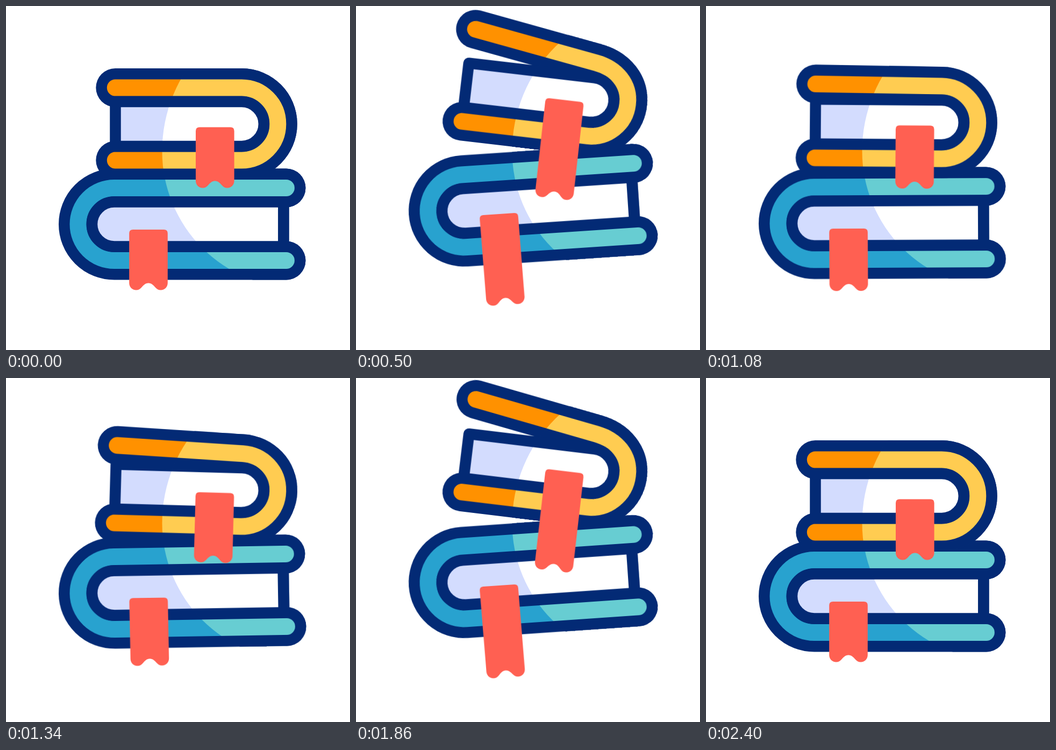
Animation, 640 px wide and 640 px high, one loop 2620 ms. Source, as an HTML page:

```html
<!DOCTYPE html>
<html lang="en">
<head>
<meta charset="utf-8">
<title>Books</title>
<style>
html, body { margin: 0; height: 100%; overflow: hidden; background: #fff; }
svg { display: block; width: 100vw; height: 100vh; }
path { fill: none; stroke-linecap: round; stroke-linejoin: round; }

.edge { stroke: #032a75; stroke-width: 72; }
.skin { stroke: var(--skin); stroke-width: 31; }
.page { stroke: #032a75; stroke-width: 20.5; fill: var(--page); }
.mark { fill: #ff6052; }

.dark { --page: #d3dcfe; }
.light { --page: #fff; }
.upper.dark { --skin: #ff9100; }
.upper.light { --skin: #ffcc51; }
.lower.dark { --skin: #28a2cf; }
.lower.light { --skin: #67cdd2; }

/* whole books: lift and tilt */
.upper, .lower { animation: lift 2620ms linear infinite; }
.upper { transform-origin: 438.3px 219.5px; --up: translateY(-47px) rotate(7deg); }
.lower { transform-origin: 201.5px 406px; --up: translateY(-26px) rotate(-4deg); }

.lower .cover { d: path("M521.4 338.5H201.5A67.5 67.5 0 0 0 201.5 473.5H521.4"); }
.lower .page { d: path("M201.5 364.5H516.3V447.5H201.5A41.5 41.5 0 0 1 201.5 364.5Z"); }
.upper .page { d: path("M438.3 178H203.5V261H438.3A41.5 41.5 0 0 0 438.3 178Z"); }

/* opening cover and stretching ribbons */
.upper .cover, .mark { d: var(--rest); animation: morph 2620ms linear infinite; }
.upper .cover {
  --rest: path("M203.3 152L438.3 152C475.6 152 505.8 182.2 505.8 219.5C505.8 256.8 475.6 287 438.3 287L203.3 287");
  --peak: path("M208.7 112L439 149.9C477.5 156.2 505.8 182.2 505.8 219.5C505.8 256.8 475.6 287 438.3 287L203.3 287");
}
.upper .mark {
  --rest: path("M353 232.5q0-7 7-7l57.6 0q7 0 7 7l0 93c0 7-5.5 13-13 13c-4 0-7.5-2-10-5c-3-3.5-7-8-12.8-8c-5.8 0-9.8 4.5-12.8 8c-2.5 3-6 5-10 5c-7.5 0-13-6-13-13z");
  --peak: path("M353 232.5q0-7 7-7l57.6 0q7 0 7 7l1 168c0 7-5.5 13-13 13c-4 0-7.5-2-10-5c-3-3.5-7-8-12.8-8c-5.8 0-9.8 4.5-12.8 8c-2.5 3-6 5-10 5c-7.5 0-13-6-13-13z");
}
.lower .mark {
  --rest: path("M229.2 423q0-7 7-7l57.6 0q7 0 7 7l0 92.5c0 7-5.5 13-13 13c-4 0-7.5-2-10-5c-3-3.5-7-8-12.8-8c-5.8 0-9.8 4.5-12.8 8c-2.5 3-6 5-10 5c-7.5 0-13-6-13-13z");
  --peak: path("M229.2 423q0-7 7-7l57.6 0q7 0 7 7l2 152.5c0 7-5.5 13-13 13c-4 0-7.5-2-10-5c-3-3.5-7-8-12.8-8c-5.8 0-9.8 4.5-12.8 8c-2.5 3-6 5-10 5c-7.5 0-13-6-13-13z");
}

@keyframes lift {
  0%, 48.168% { transform: none; animation-timing-function: cubic-bezier(.167, 0, 0, 1); }
  29.008%, 77.176% { transform: var(--up); animation-timing-function: cubic-bezier(.4, 0, .6, 1); }
  43.702%, 91.87%, 100% { transform: none; }
}
@keyframes morph {
  0%, 48.168% { d: var(--rest); animation-timing-function: cubic-bezier(.167, 0, 0, 1); }
  29.008%, 77.176% { d: var(--peak); animation-timing-function: cubic-bezier(.4, 0, .6, 1); }
  43.702%, 91.87%, 100% { d: var(--rest); }
}
</style>
</head>
<body>
<svg viewBox="0 0 640 640">
  <!-- the light falls in fixed circles while the books move -->
  <clipPath id="glowLow"><circle cx="545.5" cy="270" r="255"/></clipPath>
  <clipPath id="glowUp"><circle cx="565.5" cy="270" r="275"/></clipPath>

  <g class="lower dark">
    <path class="cover edge"/><path class="cover skin"/><path class="page"/>
  </g>
  <g clip-path="url(#glowLow)">
    <g class="lower light">
      <path class="cover edge"/><path class="cover skin"/><path class="page"/>
    </g>
  </g>
  <g class="lower"><path class="mark"/></g>

  <g class="upper dark">
    <path class="cover edge"/><path class="cover skin"/><path class="page"/>
  </g>
  <g clip-path="url(#glowUp)">
    <g class="upper light">
      <path class="cover edge"/><path class="cover skin"/><path class="page"/>
    </g>
  </g>
  <g class="upper"><path class="mark"/></g>
</svg>
</body>
</html>
```
